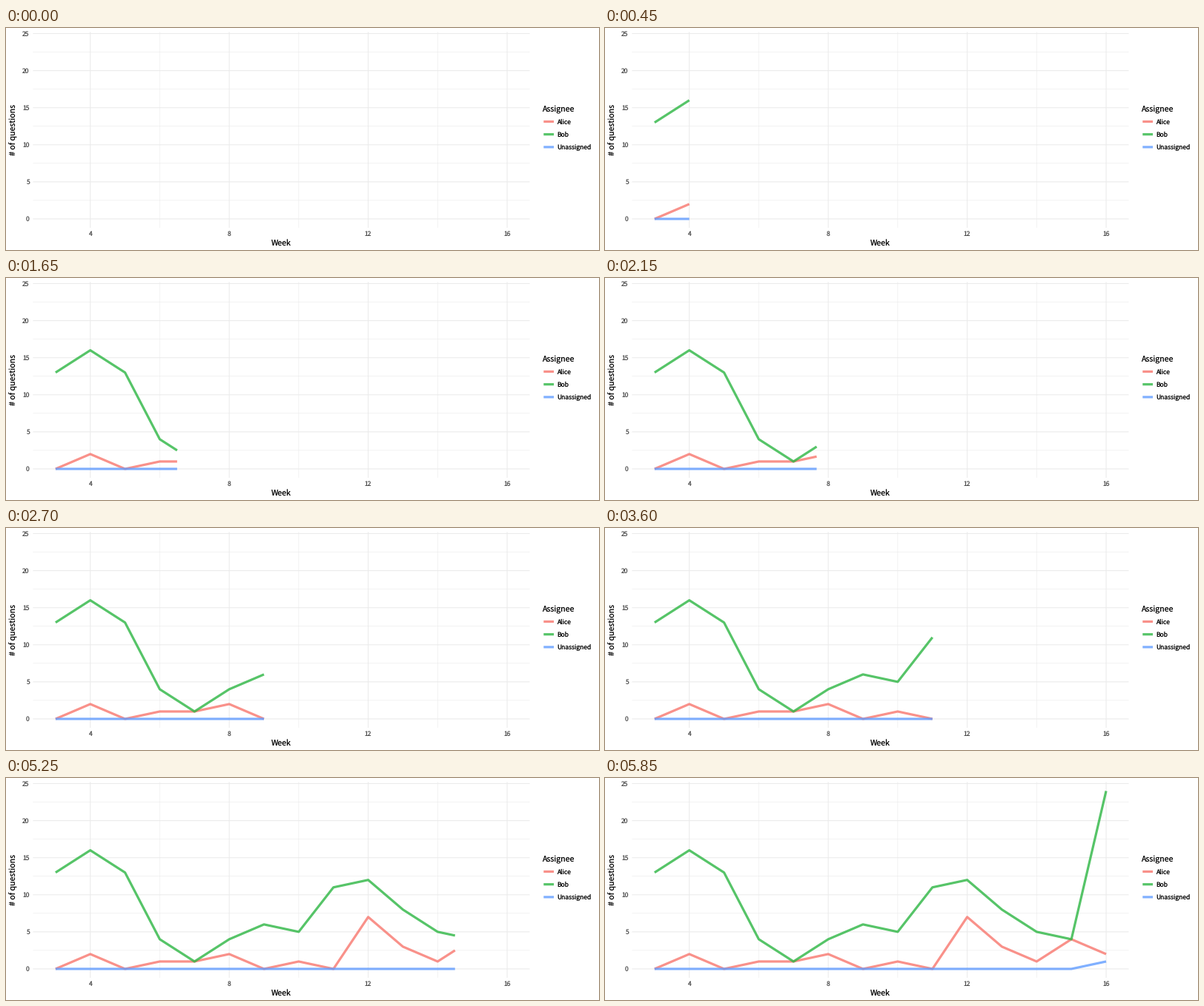
Recreate the animation shown at these times as a matplotlib script. Size 800 px wide and 300 px high, loop 6000 ms.

```python
import numpy as np
import matplotlib.pyplot as plt
from matplotlib.animation import FuncAnimation

W, H, DPI = 800, 300, 100
PX = 72 / DPI  # points per pixel

LEFT, RIGHT, TOP, BOTTOM = 36.4, 706.5, 5.5, 270.0
X_RANGE = (2.35, 16.65)
Y_RANGE = (-1.2, 25.2)

WEEKS = np.arange(3, 17)
SERIES = [
    ("Alice", "#F8766D", [0, 2, 0, 1, 1, 2, 0, 1, 0, 7, 3, 1, 4, 2]),
    ("Bob", "#2CB642", [13, 16, 13, 4, 1, 4, 6, 5, 11, 12, 8, 5, 4, 24]),
    ("Unassigned", "#619CFF", [0] * 13 + [1]),
]

STEP_MS = 50
FRAMES = 120
HOLD, MOVE = 3, 6  # frames resting on a week, steps to the next one

plt.rcParams["font.family"] = ["Noto Sans CJK JP"]
plt.rcParams["text.hinting"] = "none"

fig = plt.figure(figsize=(W / DPI, H / DPI), dpi=DPI, facecolor="white")
ax = fig.add_axes([0, 0, 1, 1])
ax.set_xlim(0, W)
ax.set_ylim(H, 0)
ax.axis("off")


def sx(week):
    return np.interp(week, X_RANGE, (LEFT, RIGHT))


def sy(count):
    return np.interp(count, Y_RANGE, (BOTTOM, TOP))


def line(xs, ys, color, width, **kw):
    return ax.plot(xs, ys, color=color, lw=width * PX, snap=False,
                   solid_capstyle="butt", solid_joinstyle="round", **kw)[0]


def label(x, y, text, size, color="black", **kw):
    ax.text(x, y, text, fontsize=size * PX, color=color,
            va="baseline", rotation_mode="anchor", **kw)


def grid(weeks, counts, width):
    for c in counts:
        line([LEFT, RIGHT], [sy(c)] * 2, "#EBEBEB", width)
    for w in weeks:
        line([sx(w)] * 2, [TOP, BOTTOM], "#EBEBEB", width)


major_x, major_y = range(4, 17, 4), range(0, 26, 5)
grid(range(6, 15, 4), np.arange(2.5, 25, 5), 0.6)
grid(major_x, major_y, 1.07)

for w in major_x:
    label(sx(w), 281.2, str(w), 8.5, "#4D4D4D", ha="center")
for c in major_y:
    label(31.6, sy(c) + 3.1, str(c), 8.5, "#4D4D4D", ha="right")

label(371.4, 294.3, "Week", 10.6, ha="center")
label(13.4, 137.7, "# of questions", 10.6, ha="center", rotation=90)
label(723.6, 113.7, "Assignee", 10.6)

curves = []
for i, (name, color, counts) in enumerate(SERIES):
    y = 126.5 + 17.2 * i
    line([725.3, 739.1], [y, y], color, 3.2, alpha=0.8)
    label(743, y + 3.2, name, 8.5)
    curves.append((line([], [], color, 3.2, alpha=0.8), counts))


def update(frame):
    week, step = divmod(frame, HOLD + MOVE)
    head = WEEKS[0] + week + max(0, step - HOLD) / MOVE
    xs = np.append(WEEKS[WEEKS < head], head)
    for curve, counts in curves:
        curve.set_data(sx(xs), sy(np.interp(xs, WEEKS, counts)))
    return [curve for curve, _ in curves]


anim = FuncAnimation(fig, update, frames=FRAMES, interval=STEP_MS,
                     init_func=lambda: update(0), repeat=True, repeat_delay=0)
plt.show()
```
